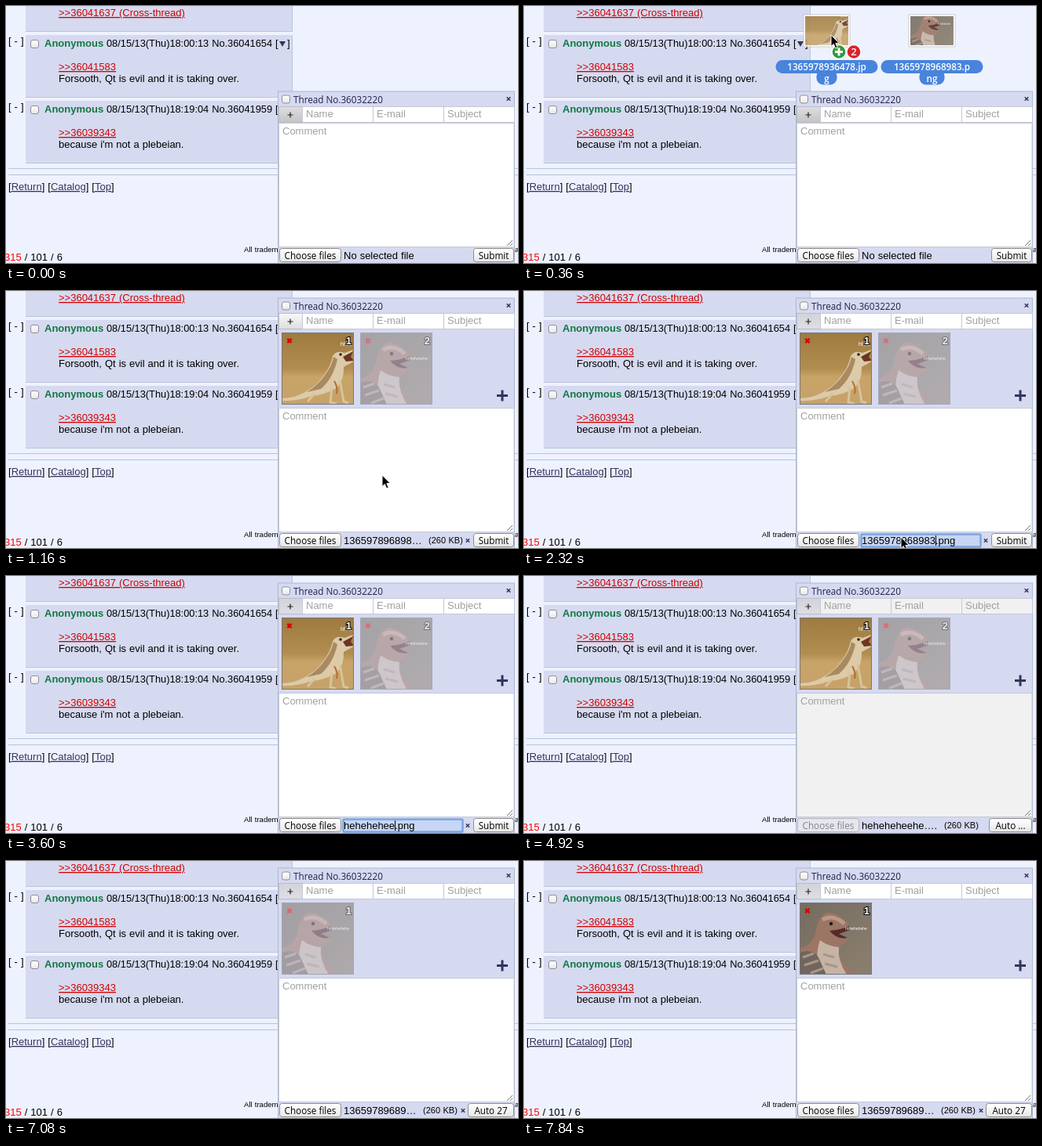
Write an HTML page that moves like this. It is 652 by 328 pixels and loops after 8000 ms.

```html
<!DOCTYPE html>
<html lang="en">
<head>
<meta charset="utf-8">
<title>Quick reply</title>
<style>
html, body { margin: 0; width: 100%; height: 100%; overflow: hidden; background: #eef2ff; }
svg { display: block; }
text { font: 13px "Liberation Sans", Arial, sans-serif; word-spacing: .4px; fill: #000; white-space: pre; }
.ui { font: 11.7px "Open Sans", sans-serif; word-spacing: 0; }
.hint { fill: #a0a0a0; }
.quote { fill: #d00000; text-decoration: underline; }
.nav tspan { fill: #34345c; text-decoration: underline; }
.meta { font-size: 12.8px; }
.small { font-size: 9.6px; }
.name { font-weight: bold; fill: #117743; }
.num { font-weight: bold; fill: #fff; stroke: #000; stroke-width: 2px; paint-order: stroke; text-anchor: end; }
.tiny { font-size: 5px; fill: #fff; }
.label { font: 600 11.7px "Open Sans", sans-serif; fill: #fff; text-anchor: middle; }
</style>
</head>
<body>
<svg id="stage" width="652" height="328" viewBox="0 0 652 328">
  <defs>
    <linearGradient id="button" x2="0" y2="1">
      <stop offset="0" stop-color="#fff"/><stop offset=".5" stop-color="#f4f4f4"/><stop offset="1" stop-color="#e6e6e6"/>
    </linearGradient>
    <linearGradient id="addFill" x2="0" y2="1">
      <stop id="addTop" offset="0"/><stop id="addEnd" offset="1"/>
    </linearGradient>
    <linearGradient id="sand" x2="0" y2="1">
      <stop offset="0" stop-color="#9d7a3f"/><stop offset=".5" stop-color="#b18d50"/>
      <stop offset=".62" stop-color="#c8a468"/><stop offset="1" stop-color="#c6a26a"/>
    </linearGradient>
    <linearGradient id="rock" x2="1" y2="1">
      <stop offset="0" stop-color="#746c5f"/><stop offset="1" stop-color="#8c7f6f"/>
    </linearGradient>
    <symbol id="photo1" viewBox="0 0 92 92">
      <rect width="92" height="92" fill="url(#sand)"/>
      <path d="M0 84Q20 84 36 72Q46 66 54 54Q62 44 65 30Q70 22 80 26L91 22L87 31L92 37Q84 41 79 44Q80 60 70 71Q54 80 38 81Q20 88 0 87Z" fill="#dccaa8"/>
      <path d="M32 76Q48 66 56 53Q64 42 66 31L71 34Q66 58 50 72Z" fill="#a98a60"/>
      <path d="M78 31L91 24L88 31L92 36L82 37Z" fill="#6b3524"/>
      <path d="M74 60L79 88L85 90M64 70L62 89L70 91M42 78L33 88" fill="none" stroke="#d8c39b" stroke-width="3"/>
      <path d="M67 62Q72 70 70 78" fill="none" stroke="#b86a32" stroke-width="2"/>
      <circle cx="75" cy="28" r="1.8" fill="#2a2016"/>
      <text x="75" y="17" class="tiny" style="font-size:7px">hhhc</text>
    </symbol>
    <symbol id="photo2" viewBox="0 0 92 92">
      <rect width="92" height="92" fill="url(#rock)"/>
      <path d="M0 58Q14 56 20 40Q22 20 34 13Q46 11 62 27L64 34L50 40L63 46Q54 56 46 60Q52 76 70 92L0 92Z" fill="#9c7565"/>
      <path d="M26 48Q36 56 50 57Q48 74 60 92L28 92Q18 70 26 48Z" fill="#c5b4a5"/>
      <path d="M0 64Q16 58 24 70L34 92L0 92Z" fill="#71665d"/>
      <path d="M38 36Q52 35 63 30L64 35L50 40L61 45Q48 48 38 36Z" fill="#542b28"/>
      <path d="M29 22Q42 14 57 27" fill="none" stroke="#bd9985" stroke-width="5"/>
      <path d="M4 70L18 65M6 80L24 74M14 90L30 84M30 66L44 70M32 78L48 82" stroke="#aa9586" stroke-width="3"/>
      <circle cx="40" cy="27" r="2.2" fill="#241a16"/>
      <text x="58" y="35" class="tiny">hhhehehehe</text>
    </symbol>
  </defs>
  <rect width="652" height="328" fill="#eef2ff"/>
  <g id="page"></g>
  <g id="form"></g>
  <g id="drag"></g>
  <path id="cursor" d="M0 0V14.5L3.3 11.5L5.7 17L8.2 16L5.8 10.6H10.3Z" fill="#000" stroke="#fff"/>
</svg>
<script>
const $ = id => document.getElementById(id);
const text = (x, y, s, cls = '', extra = '') => `<text x="${x}" y="${y}" class="${cls}" ${extra}>${s}</text>`;
const rect = (x, y, w, h, fill, stroke = 'none', extra = '') =>
  `<rect x="${x}" y="${y}" width="${w}" height="${h}" fill="${fill}" stroke="${stroke}" ${extra}/>`;
const checkbox = (x, y) => rect(x, y, 10, 10, 'url(#button)', '#8e8e96', 'rx="2.5"');
const cross = (x, y, r, color, width) =>
  `<path d="M${x - r} ${y - r}l${2 * r} ${2 * r}m0 ${-2 * r}l${-2 * r} ${2 * r}" stroke="${color}" stroke-width="${width}"/>`;
const button = (x, w, s, off) =>
  rect(x + .5, 309.5, w - 1, 17, off ? '#e6e7ee' : 'url(#button)', off ? '#b4b5bd' : '#8c8c8c', 'rx="3"') +
  text(x + w / 2, 323, s, 'ui', `text-anchor="middle" style="fill:${off ? '#858585' : '#000'}"`);

// Post background, bordered on the right and bottom only.
const panel = (y, h) => rect(25, y, 340, h, '#d6daf0') +
  `<path d="M25 ${y + h - .5}H364.5V${y}" fill="none" stroke="#b7c5d9"/>`;

function post(y, time, no, quote, body) {
  return panel(y, 80) + text(3, y + 12, '[ - ]') + checkbox(31.5, y + 6.5) +
    text(49, y + 15, 'Anonymous', 'name') + text(128, y + 15, `08/15/13(Thu)${time} No.${no} [`, 'meta') +
    `<path d="M348 ${y + 8}h8l-4 7z" fill="#34345c"/>` + text(358, y + 15, ']') +
    text(67, y + 45, '&gt;&gt;' + quote, 'quote') + text(67, y + 60, body);
}

$('page').innerHTML =
  panel(-47, 80) +
  text(67, 13, '&gt;&gt;36041637 (Cross-thread)', 'quote') +
  post(37, '18:00:13', '36041654', '36041583', 'Forsooth, Qt is evil and it is taking over.') +
  post(121, '18:19:04', '36041959', '36039343', "because i'm not a plebeian.") +
  '<path d="M3 207.5H652M3 215.5H652" stroke="#b7c5d9"/>' +
  text(3, 235, '[<tspan>Return</tspan>] [<tspan>Catalog</tspan>] [<tspan>Top</tspan>]', 'nav') +
  text(-2, 325, '<tspan fill="#f00">315</tspan> / 101 / 6') +
  text(303, 314, 'All trademarks', 'small') + text(648, 314, 'a', 'small');

function thumb(x, photo, n, alpha, removable) {
  return `<g opacity="${alpha}"><use href="#photo${photo}" x="${x}" y="53" width="92" height="92"/>` +
    rect(x + .5, 53.5, 91, 91, 'none', '#77777a') +
    (removable ? cross(x + 10, 63.5, 2.6, '#d00', 2.6) : '') + text(x + 89, 68, n, 'num') + '</g>';
}

const fileInfo = (name, sizeX, closeX) => text(430, 323, name) +
  text(sizeX, 322, '(260 KB)', '', 'style="font-size:11px"') +
  (closeX ? cross(closeX, 318.5, 2.2, '#34345c', 1.4) : '');

// File name field: n letters typed in front of the extension.
function editor(t) {
  const fresh = t < 2760, selected = fresh && t >= 2600;
  const n = t < 2920 ? 0 : t < 3600 ? Math.min(8, Math.floor((t - 2920) / 70) + 1) : t < 3720 ? 9 : t < 3760 ? 10 : 11;
  const stem = fresh ? '1365978968983' : 'heheheheehe'.slice(0, n);
  const caret = 430 + stem.length * 7.23;
  return rect(429.5, 310.5, 152, 16, '#c8d6f5', '#7aa5e2', 'stroke-width="2.5" rx="1"') +
    (selected ? rect(430, 312, 94, 14, '#a9cbf5') : '') + text(430, 323, stem + '.png') +
    (selected ? '' : rect(caret, 312, 1, 13, '#000')) + cross(588, 318.5, 2.2, '#34345c', 1.4);
}

function footer(t) {
  if (t < 880) return text(430, 323, 'No selected file');
  if (t < 2320) return fileInfo('136597896898…', 538, 588);
  if (t < 3920) return editor(t);
  if (t < 7000) return fileInfo('heheheheehe….', 535);
  return fileInfo('13659789689…', 531, 582);
}

const ease = p => { p = Math.max(0, Math.min(1, p)); return p * p * (3 - 2 * p); };

function thumbs(t) {
  if (t < 880) return '';
  const list = t < 7000
    ? thumb(351, 1, 1, .5 + .5 * ease((t - 880) / 240), t < 3920) + thumb(451, 2, 2, .5, true)
    : thumb(351, 2, 1, .5 + .5 * ease((t - 7000) / 560), true);
  return list + '<path d="M625 133.5h14m-7-7v14" stroke="#34345c" stroke-width="3"/>';
}

function form(t) {
  const top = t < 880 ? 108 : 8, locked = t >= 3920 && t < 7000;
  const paper = locked ? '#f1f1f1' : '#fff';
  const field = (x, s) => rect(x + .5, top + 20.5, 90, 20, paper, '#c4c8d8') + text(x + 5, top + 34, s, 'hint');
  const submit = t < 3920 ? button(595, 52, 'Submit') : locked ? button(592, 55, 'Auto ...') : button(588, 59, 'Auto 27');
  return rect(346.5, top + 1, 301, 330, '#d6daf0', '#b0b8d0') +
    checkbox(351.5, top + 6) + text(366, top + 15.5, 'Thread No.36032220', 'ui', 'style="fill:#22224a"') +
    cross(640, top + 10.5, 2.3, '#34345c', 1.5) +
    rect(347.5, top + 20.5, 30, 20, 'url(#addFill)', '#b9bccb') +
    `<path d="M358.5 ${top + 31}h7m-3.5-3.5v7" stroke="#222" stroke-width="1.2"/>` +
    field(377, 'Name') + field(467, 'E-mail') + field(557, 'Subject') + thumbs(t) +
    rect(347.5, 149.5, 299.5, 158, paper, '#c4c8d8') + text(352, 164, 'Comment', 'hint') +
    '<path d="M638 306l7-7m-3 7l3-3" stroke="#777"/>' +
    button(348, 79, 'Choose files', locked) + footer(t) + submit;
}

// Drag image, placed relative to the pointer tip.
function dragged(x, photo, first, rest, restW) {
  const mid = x + 29.5;
  return `<g opacity=".9">${rect(x, -26, 59, 41, '#fff', '#aaa', 'stroke-width=".6"')}
    <svg x="${x + 2}" y="-24" width="55" height="37" viewBox="0 16 92 62"><use href="#photo${photo}" width="92" height="92"/></svg></g>` +
    rect(mid - 65, 32, 130, 17, '#4884dc', 'none', 'rx="8.5"') +
    rect(mid - restW / 2, 44, restW, 19.5, '#4884dc', 'none', 'rx="8.5"') +
    text(mid, 44.5, first, 'label') + text(mid, 59.5, rest, 'label');
}
const badge = (x, fill) => `<circle cx="${x}" cy="21.5" r="9" fill="${fill}" stroke="#fff" stroke-width="1.4"/>`;
$('drag').innerHTML = dragged(-35, 1, '1365978936478.jp', 'g', 26) + dragged(99, 2, '1365978968983.p', 'ng', 32) +
  badge(10, '#2f9a3c') + '<path d="M5 21.5h10m-5-5v10" stroke="#fff" stroke-width="3"/>' +
  badge(29, '#d9252b') + text(29, 26, '2', 'label', 'style="font-size:13px"');

// Pointer path: [time, x, y].
const path = [[40, 396, -50], [360, 391, 37], [840, 474, 216], [1160, 479, 235], [1680, 478, 312], [2000, 480, 314]];
function pointer(t) {
  let i = 1;
  while (i < path.length - 1 && t > path[i][0]) i++;
  const [a, b] = [path[i - 1], path[i]], p = ease((t - a[0]) / (b[0] - a[0]));
  return `translate(${a[1] + (b[1] - a[1]) * p} ${a[2] + (b[2] - a[2]) * p})`;
}

function draw(t) {
  const [c1, c2] = t < 880 ? ['#dedede', '#c4c4c4'] : t < 1800 ? ['#f8f8f8', '#dedede'] : ['#d2d3da', '#dedfe4'];
  $('addTop').setAttribute('stop-color', c1);
  $('addEnd').setAttribute('stop-color', c2);
  $('form').innerHTML = form(t);
  const at = pointer(t);
  $('drag').setAttribute('transform', at);
  $('cursor').setAttribute('transform', at);
  $('drag').style.display = t >= 40 && t < 880 ? '' : 'none';
  $('cursor').style.display = t >= 40 && t < 2600 ? '' : 'none';
}

const start = performance.now();
let last = -1;
function tick() {
  const t = Math.floor((performance.now() - start) % 8000 / 40) * 40;
  if (t !== last) draw(last = t);
  requestAnimationFrame(tick);
}
tick();
</script>
</body>
</html>
```
